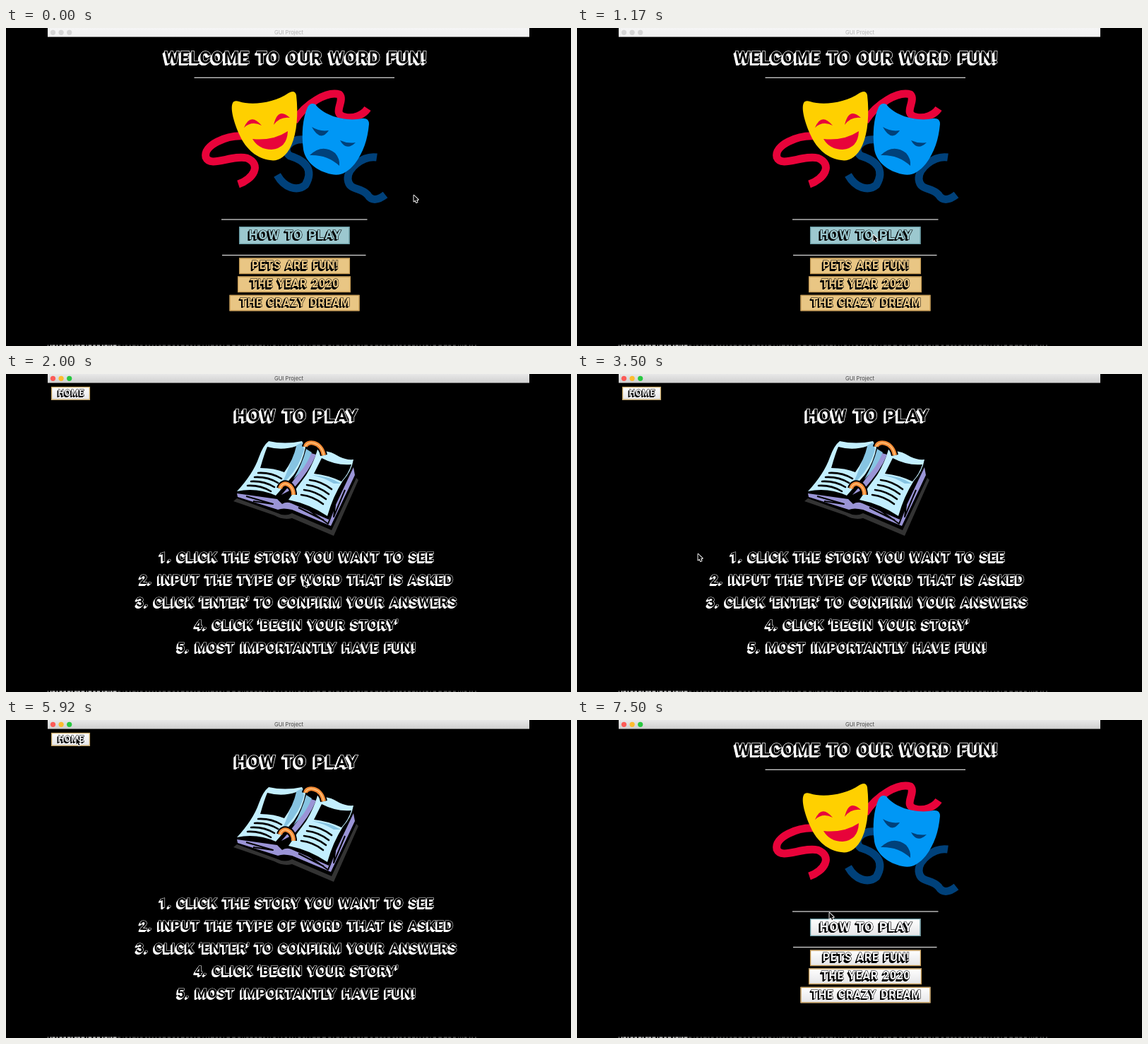
Recreate the animation shown at these times as an HTML page with a canvas. Size 800 by 450 pixels, loop 7580 ms.

```html
<!DOCTYPE html>
<html lang="en">
<head>
<meta charset="utf-8">
<title>GUI Project</title>
<style>
  html, body { margin: 0; width: 100%; height: 100%; overflow: hidden; background: #000; }
  canvas { display: block; width: 800px; height: 450px; }
</style>
</head>
<body>
<canvas id="stage" width="800" height="450"></canvas>
<script>
const ctx = document.getElementById('stage').getContext('2d');
const LOOP = 7580, STEP = 1000 / 12;
const ACTIVATE = 17, OPEN_HELP = 22, GO_HOME = 73;

// Cursor stops: [step, x, y]
const stops = [
  [0, 577, 236], [3, 577, 236], [13, 419, 292], [24, 421, 291], [30, 421, 291],
  [40, 176, 270], [42, 171, 254], [56, 110, 41], [61, 110, 41],
  [68, 99, 25], [80, 99, 25], [90, 357, 272]
];

const RED = '#e8033a', YELLOW = '#ffd000', BLUE = '#0097f5', NAVY = '#00417a';
const PAGE = '#c3efff', SKY = '#86c4e2', LILAC = '#9a94d6', ORANGE = '#f58a35';

function fill(d, color) {
  ctx.fillStyle = color;
  ctx.fill(new Path2D(d));
}

function stroke(d, color, width, cap = 'butt') {
  ctx.strokeStyle = color;
  ctx.lineWidth = width;
  ctx.lineCap = cap;
  ctx.lineJoin = 'round';
  ctx.stroke(new Path2D(d));
}

// Hollow block letters with an extruded edge toward the lower left
function lettering(text, cx, cy, size, ink, face) {
  const depth = size * 0.13;
  const x = cx + depth / 2;
  const y = cy + size * 0.355 - depth / 2;
  ctx.font = `bold ${size}px Roboto, sans-serif`;
  ctx.letterSpacing = size * 0.04 + 'px';
  ctx.wordSpacing = size * 0.1 + 'px';
  ctx.textAlign = 'center';
  ctx.textBaseline = 'alphabetic';
  ctx.lineJoin = 'miter';
  ctx.miterLimit = 3;
  ctx.fillStyle = ctx.strokeStyle = ink;
  ctx.lineWidth = size * 0.06;
  for (let i = depth; i >= 0; i -= 0.5) ctx.fillText(text, x - i, y + i);
  ctx.strokeText(text, x, y);
  ctx.fillStyle = face;
  ctx.fillText(text, x, y);
  ctx.letterSpacing = ctx.wordSpacing = '0px';
}

function titleBar(active) {
  const shade = ctx.createLinearGradient(0, 0, 0, 13);
  shade.addColorStop(0, active ? '#e8e8e8' : '#f5f5f5');
  shade.addColorStop(1, active ? '#cfcfcf' : '#f1f1f1');
  ctx.fillStyle = shade;
  ctx.fillRect(59, 0, 682, 12.6);
  const lights = active ? ['#fc5b57', '#fdbc2e', '#28c840'] : ['#d5d5d5', '#d5d5d5', '#d5d5d5'];
  lights.forEach((color, i) => {
    ctx.fillStyle = color;
    ctx.beginPath();
    ctx.arc(66.5 + i * 11.6, 6.3, 3.6, 0, Math.PI * 2);
    ctx.fill();
  });
  ctx.font = '7.7px Inter, Roboto, sans-serif';
  ctx.textAlign = 'center';
  ctx.textBaseline = 'middle';
  ctx.fillStyle = active ? '#454545' : '#b2b2b2';
  ctx.fillText('GUI Project', 400.5, 6.8);
}

// Tops of the text line cut off by the lower edge
function bottomStrip() {
  let seed = 7;
  const random = () => (seed = seed * 16807 % 2147483647) / 2147483647;
  for (let x = 59; x < 665;) {
    const w = 1 + random() * 4;
    ctx.fillStyle = x < 155 ? '#b9b9b9' : '#4c4c4c';
    ctx.fillRect(x, 448.4, w, 1.6);
    x += w + (x < 155 ? 0.6 : 1.5) + random() * 2;
  }
}

function rule(x1, x2, y) {
  ctx.fillStyle = '#dedede';
  ctx.fillRect(x1, y - 0.6, x2 - x1, 1.2);
}

function button(text, x, y, w, h, size, tint, border, active) {
  const face = active ? '#f4f4f5' : tint;
  const shade = ctx.createLinearGradient(0, y, 0, y + h);
  shade.addColorStop(0, active ? '#ffffff' : tint);
  shade.addColorStop(1, active ? '#e5e5e7' : tint);
  ctx.fillStyle = shade;
  ctx.fillRect(x, y, w, h);
  ctx.strokeStyle = border;
  ctx.lineWidth = 1.3;
  ctx.strokeRect(x + 0.6, y + 0.6, w - 1.2, h - 1.2);
  lettering(text, x + w / 2, y + h / 2, size, '#000', face);
}

function masks() {
  stroke('M338 153C312 151 279 166 283 183C289 198 320 179 341 184C363 193 350 214 329 221', RED, 11);
  stroke('M408 132C425 106 455 89 472 94C481 103 460 122 480 126C492 129 506 123 512 114', RED, 11);
  stroke('M424 158C401 156 390 172 402 181C425 188 436 201 424 222C412 232 394 226 384 208', NAVY, 11);
  stroke('M525 183C505 180 483 199 484 214C486 231 501 224 512 236C518 246 528 243 537 236', NAVY, 11);

  fill('M321 106Q323 102 330 104C348 110 380 106 400 92Q409 87 411 95C414 122 412 148 404 166C396 184 384 189 374 187C356 185 340 172 331 152C323 135 317 114 321 106Z', YELLOW);
  fill('M337 141Q346 119 362 138Q348 131 337 141Z', RED);
  fill('M379 137Q385 111 402 127Q388 125 379 137Z', RED);
  fill('M349 157Q378 160 399 146Q398 170 376 172Q358 172 349 157Z', RED);

  fill('M427 112Q431 105 438 108C450 124 480 133 505 128Q514 127 514 136C512 158 506 176 494 192C484 204 474 210 461 207C441 203 424 190 421 172C418 150 420 128 427 112Z', BLUE);
  fill('M433 140Q444 147 457 145Q445 162 433 140Z', NAVY);
  fill('M473 159Q484 164 495 162Q482 175 473 159Z', NAVY);
  fill('M430 180Q448 163 466 177Q473 185 472 195Q455 179 430 180Z', NAVY);
}

function book() {
  fill('M322 180L327 176L385 197Q395 202 405 197L461 221L496 147L499 150L464 229L405 204Q392 207 380 200Z', '#333');
  fill('M327 169L384 177L391 184Q397 180 404 183L457 206L492 132L494 143L460 215L405 192Q392 189 385 192L328 174Z', LILAC);
  stroke('M340 173L378 184L350 180M414 189L450 207M424 189L456 212L466 186L464 202L480 164', '#000', 2);

  // Left leaf with its shaded inner side
  fill('M372 95Q395 100 419 95L424 104Q420 125 408 142Q394 158 382 172Q355 160 327 166Q350 141 358 118Q364 101 372 95Z', PAGE);
  fill('M411 101L419 97L422 107Q416 130 399 148L390 157Q401 133 411 101Z', SKY);
  fill('M370 103Q391 109 411 102Q407 121 394 139Q380 133 360 133Q366 112 370 103Z', '#000');

  // Right leaf and gutter
  fill('M432 112L439 114Q430 137 407 162L390 171Q418 140 432 112Z', LILAC);
  fill('M425 106L433 111Q424 133 407 149Q420 126 425 106Z', SKY);
  fill('M441 107Q460 109 472 117Q482 122 492 121Q489 138 477 151Q463 173 455 201Q430 184 400 178Q412 160 425 143Q436 125 441 107Z', PAGE);
  fill('M447 119Q468 130 489 128Q485 141 475 152Q456 143 436 141Z', '#000');
  fill('M433 143Q456 144 474 155L464 155Q449 146 433 143Z', SKY);
  for (let i = 0; i < 4; i++) {
    stroke(`M${357 - i * 5} ${140 + i * 6}q18 -1 33 8`, '#000', 2.6, 'round');
    stroke(`M${430 - i * 4} ${150 + i * 7}q17 2 31 13`, '#000', 2.6, 'round');
  }
  for (const ring of ['M424 103C425 94 446 94 450 115', 'M388 162C391 150 407 155 407 171']) {
    stroke(ring, '#000', 10);
    stroke(ring, ORANGE, 6);
    stroke(ring, '#ffc37b', 1.5);
  }
}

function homePage(active) {
  lettering('WELCOME TO OUR WORD FUN!', 409, 43, 24.2, '#fff', '#000');
  rule(266.5, 550, 70.3);
  masks();
  rule(305, 511.5, 271);
  button('HOW TO PLAY', 330, 281, 156.5, 25, 18.5, '#9cc8cf', '#6b9fa8', active);
  rule(306, 509.5, 321.5);
  const stories = [
    ['PETS ARE FUN!', 330, 325.5, 157],
    ['THE YEAR 2020', 328, 351.5, 160],
    ['THE CRAZY DREAM', 316.5, 377.8, 184]
  ];
  for (const [text, x, y, w] of stories)
    button(text, x, y, w, 22.6, 16, '#e9c684', '#c79c55', active);
}

function helpPage() {
  button('HOME', 64, 18, 55, 18.8, 12.6, '#fff', '#c8a765', true);
  lettering('HOW TO PLAY', 410, 59.5, 24.6, '#fff', '#000');
  book();
  [
    '1. CLICK THE STORY YOU WANT TO SEE',
    '2. INPUT THE TYPE OF WORD THAT IS ASKED',
    "3. CLICK 'ENTER' TO CONFIRM YOUR ANSWERS",
    "4. CLICK 'BEGIN YOUR STORY'",
    '5. MOST IMPORTANTLY HAVE FUN!'
  ].forEach((line, i) => lettering(line, 410.5, 259.5 + i * 32, 19.2, '#fff', '#000'));
}

function cursorAt(step) {
  const next = Math.max(1, stops.findIndex(s => s[0] >= step));
  const [s0, x0, y0] = stops[next - 1];
  const [s1, x1, y1] = stops[next];
  const u = (step - s0) / (s1 - s0);
  const ease = u * u * (3 - 2 * u);
  return [x0 + (x1 - x0) * ease, y0 + (y1 - y0) * ease];
}

function cursor(x, y) {
  const arrow = 'M0 0V8.6L2 6.8L3.5 10.2L5 9.5L3.6 6.2H6.2Z';
  ctx.save();
  ctx.translate(x + 0.5, y + 0.8);
  stroke(arrow, '#fff', 1.9);
  fill(arrow, '#000');
  ctx.restore();
}

function draw(now) {
  const step = Math.min(90, Math.floor((now % LOOP + 5) / STEP));
  const active = step >= ACTIVATE;
  ctx.fillStyle = '#000';
  ctx.fillRect(0, 0, 800, 450);
  titleBar(active);
  bottomStrip();
  if (step >= OPEN_HELP && step < GO_HOME) helpPage();
  else homePage(active);
  cursor(...cursorAt(step));
}

const start = performance.now();
function tick() {
  draw(performance.now() - start);
  requestAnimationFrame(tick);
}
tick();
</script>
</body>
</html>
```
